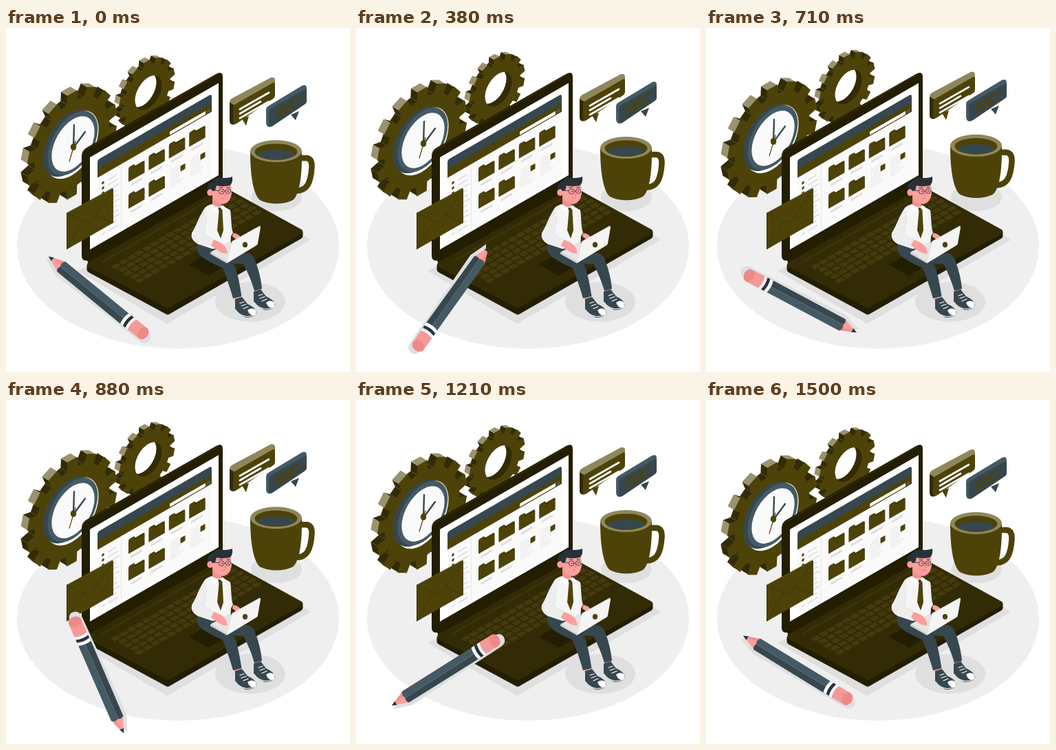
Recreate the animation shown at these times as an HTML page. Size 500 by 500 pixels, loop 1540 ms.

```html
<!DOCTYPE html>
<html lang="en">
<head>
<meta charset="utf-8">
<title>Desk work</title>
<style>
  html, body { margin: 0; width: 100%; height: 100%; overflow: hidden; background: #fff; }
  svg { display: block; width: 100%; height: 100%; }
</style>
</head>
<body>
<svg id="stage" viewBox="0 0 500 500"></svg>
<script>
const C = {
  olive: '#4d4309', deep: '#332b05', dark: '#231d02', pale: '#9a9270',
  blue: '#37474f', slate: '#455a64', ink: '#263238',
  skin: '#fb9f9c', pink: '#f28f8f', shade: '#dfdfdf', floor: '#efefef'
};

const path = (d, fill, extra = '') => `<path d="${d}" fill="${fill}" ${extra}/>`;
const line = (d, stroke, w = 1) =>
  `<path d="${d}" fill="none" stroke="${stroke}" stroke-width="${w}" stroke-linecap="round" stroke-linejoin="round"/>`;
const oval = (x, y, rx, ry, fill) => `<ellipse cx="${x}" cy="${y}" rx="${rx}" ry="${ry}" fill="${fill}"/>`;
const rect = (x, y, w, h, fill, r = 0) => `<rect x="${x}" y="${y}" width="${w}" height="${h}" rx="${r}" fill="${fill}"/>`;
const group = (matrix, body) => `<g transform="matrix(${matrix})">${body}</g>`;
const round = (fill, w) => `stroke="${fill}" stroke-width="${w}" stroke-linejoin="round"`;
const disc = (x, y, r, fill) => group(`.866 -.5 0 1 ${x} ${y}`, `<circle r="${r}" fill="${fill}"/>`);
const poly = p => 'M' + p.map(q => q.map(v => v.toFixed(1)).join(' ')).join('L') + 'Z';

// Extruded cog standing in the left-facing isometric plane.
function cog(cx, cy, outer, root, dx, dy) {
  const teeth = 14, step = 2 * Math.PI / teeth, pts = [];
  for (let i = 0; i < teeth; i++) {
    for (const [k, r] of [[-.3, root], [-.23, outer], [.23, outer], [.3, root]]) {
      const a = -1.56 + (i + k) * step, x = r * Math.cos(a);
      pts.push([cx + .866 * x, cy - .5 * x + r * Math.sin(a)]);
    }
  }
  let sides = '', tips = '';
  pts.forEach((p, i) => {
    const q = pts[(i + 1) % pts.length], nx = q[1] - p[1], ny = p[0] - q[0];
    if (nx * dx + ny * dy <= 0) return;
    const quad = poly([p, q, [q[0] + dx, q[1] + dy], [p[0] + dx, p[1] + dy]]);
    if (i % 4 === 1 && ny < 0) tips += path(quad, C.pale);
    else sides += path(quad, C.deep);
  });
  return sides + tips + path(poly(pts), C.olive, round(C.olive, 1.5));
}

// The hole shows white only where its front and back rims overlap.
function smallCog() {
  const hole = '<circle r="22.5" transform="matrix(.866 -.5 0 1 207 94)"/>';
  return cog(205, 95, 46, 38, -8, -4) + `<clipPath id="hole">${hole}</clipPath>` + disc(207, 94, 22.5, C.deep) +
    `<g clip-path="url(#hole)">${disc(199, 90, 22.5, '#fff')}</g>`;
}

function clock() {
  return disc(96, 169.5, 44.5, '#fff') + disc(91.5, 167.5, 43.5, C.blue) + disc(97, 167.5, 42, C.slate) +
    disc(97.5, 168.5, 36, '#fafafa') +
    line('M98 174L99 141M98 174L115 151', C.blue, 2.4) + line('M101 164L92 194', C.olive, 1.2) +
    oval(98, 173, 4.2, 5, C.olive);
}

function mug() {
  return line('M428 189L437 189Q445 190 444.5 202C443 226 437 237 421 236.5', C.olive, 8.5) +
    path('M355 180C355 217 360 243 369 250C382 257 404 257 417 250C426 243 430.5 217 430 180Z', C.olive) +
    oval(392.5, 179, 37.5, 16, '#8f875c') + oval(392.5, 180, 31, 11.8, C.olive) + oval(392.5, 183.8, 26, 6.8, C.blue);
}

function bubbles() {
  return path('M343 132L349 142L353 128Z', C.olive) +
    path('M325 108Q325 104 329 102L385 72Q391 71 391 76L391 84L330 118Z', '#8f875c') +
    path('M325 108L333 113V140Q325 142 325 135Z', C.deep) +
    path('M330 116Q330 113 333 111L388 79.5Q391 78 391 82L391 98Q391 101 388 103L335 139Q330 141 330 136Z', C.olive) +
    line('M340 118L382 94M340 124.5L370 107M340 131L382 107', '#fff', 2.8) +
    path('M414 126L421 134L426 121Z', C.blue) +
    path('M378 119Q378 115 382 113L430 84Q437 81 437 88L437 106Q437 109 434 111L388 142Q379 147 378 138Z', C.slate) +
    path('M382 122Q382 119 385 117L433 90Q437 88 437 92L437 106Q437 109 434 111L388 142Q382 146 382 140Z', C.blue) +
    line('M393 120L427 100M393 125.5L416 112M393 131L427 111', C.olive, 2.5);
}

function folder(x, y) {
  return path(`M${x} ${y + 3}Q${x} ${y} ${x + 2} ${y}H${x + 8}L${x + 10} ${y + 3}H${x + 21}Q${x + 23.5} ${y + 3} ${x + 23.5} ${y + 6}V${y + 21}H${x}Z`, C.olive) +
    line(`M${x + 8} ${y + 2.5}L${x + 10} ${y + 5}H${x + 23}`, C.deep, .8) +
    rect(x + 3, y + 26, 17, 3, '#dcdcdc', 1);
}

function note(x, y) {
  let s = '';
  for (let i = 0; i < 8; i++) s += rect(x, y + i * 3.6, i < 3 ? 13 : 19 - i % 3 * 3, 1.1, '#e0e0e0');
  return s + rect(x + 14.5, y + 2.5, 7, 8, C.olive, 1);
}

function screen() {
  let s = rect(0, 0, 187, 134, '#fff') + rect(11, 20, 166, 110, '#fafafa') +
    path('M11 14Q11 10 14 10H174Q177 10 177 14V24H11Z', C.blue) + rect(11, 23, 166, 13, C.olive) +
    rect(116, 29.5, 52, 5, '#fff', 1) + rect(169.5, 29.5, 5, 5, C.slate, 2) +
    rect(45, 36, .8, 94, '#e2e2e2');
  for (let i = 0; i < 11; i++) {
    const y = 47 + i * 7.4;
    s += rect(26, y, 13 + i % 3 * 2, 2, '#dedede', 1);
    s += i < 3 ? oval(19, y + 1, 1.8, 2, C.olive) : rect(17, y, 5, 2, '#dedede');
  }
  for (let i = 0; i < 4; i++) s += folder(56 + i * 29.4, 47);
  s += folder(56, 86) + folder(85.4, 86) + note(117, 86) + note(146, 86);
  return group('1 -.577 0 1 122 188', s);
}

function laptop() {
  let keys = '';
  for (let r = 0; r < 5; r++) {
    for (let c = 0; c < 16; c++) keys += rect(c * 11.3 + r % 2 * 1.5, r * 8.7, 9.3, 6.6, '#443a0d', 1);
  }
  return path('M104 353L234 430L443 308L420 293L120 345Z', C.shade) +
    path('M110 186Q110 178 117 174L306 66.5Q315 62 315 71V238L122 348L118 338Q110 339 110 331Z', C.dark) +
    line('M111.5 183Q112 179 118 176L307 68', C.deep, 1.5) + screen() +
    path('M122 346L235 408L427 297V302L235 412L122 351Z', C.dark, round(C.dark, 9)) +
    path('M122 344L316 235L427 296L235 403Z', C.deep, round(C.deep, 8)) +
    line('M140 340L318 238', '#3d3309', 3) +
    group('1 -.577 1 .577 152 347', keys) +
    path('M266 344L291 329L320 345L295 360Z', C.dark);
}

function envelope() {
  return path('M88 269L154 233L156 234V283L88 322Z', C.olive) +
    line('M88.5 269L155 233.5', '#5c5219', 1) + line('M88.5 269V321', C.deep, .8) +
    line('M90 270L118 282Q123 284 125 279L155 236M89 320L113 280M155 283L130 272', '#3d3407', .9);
}

function shoe(x, y) {
  return group(`1 0 0 1 ${x} ${y}`,
    path('M0 3L10 0L18 10Q31 16 31 23Q28 30 16 30Q2 25 0 17Z', C.blue) +
    path('M18 19Q24 14 30 19Q32 24 27 27Q21 27 18 19Z', '#fff') +
    line('M1 19Q6 27 17 28.5Q27 28 30 24', '#fff', 1.2) +
    line('M7 9L13 7M9 13L16 10.5M12 17L19 14', '#fff', 1.2));
}

function man() {
  return oval(355, 398, 51, 29, C.shade) +
    path('M361 378L371 377L372 384L362 386Z', C.skin) + path('M331 390L342 389L343 395L333 397Z', C.skin) +
    shoe(360, 380) + shoe(333, 391) +
    path('M318 322L344 328C351 325 359 329 362 337C368 353 371 367 372 379L361 382C357 368 351 354 345 343L318 342Z', C.blue) +
    path('M278 314C274 330 290 337 315 349C321 364 326 379 330 393L342.5 390C340 374 337 358 333 346C327 332 312 318 300 314Z', C.blue) +
    line('M320 336Q331 341 333 349', C.ink, .8) +
    path('M300 244H313V258Q308 265 300 258Z', C.pink) +
    path('M299 256Q291 258 288 263C279 277 276 290 270 298Q268 308 279 314L300 321L326 318C328 300 327 276 325 264L314 258Q308 263 299 256Z', '#f5f5f5') +
    path('M290 260C279 277 276 290 270 298Q268 308 279 314L300 318L306 310L288 300C289 294 290 287 292 276Z', '#ededed') +
    path('M322 268L326 264C328 280 327 290 330 297L326 305Z', '#f0f0f0') +
    line('M292 276C290 287 289 294 288 300L306 310', '#dcdcdc', .8) +
    path('M308 261L314 261L314.5 266L316 294L312 306L307 294L309.5 266Z', C.olive) +
    path('M299 256L309 262L304 267L297 260ZM314 257L312 262L317 266L318 260Z', '#fff') +
    path('M330 298Q337 298 342 305L337 309L329 303Z', C.skin) +
    path('M297 326L324 311L345 322L321 341Z', '#e4e4e4') + path('M297 326L321 339.5V342L297 328.5Z', '#cfcfcf') +
    path('M302 308Q313 311 318 317Q323 325 321 328Q315 328 309 324L298 316Z', C.skin) +
    path('M328 312Q328 310 330 309L368 288Q370 287 370 290L366 313Q366 315 364 316L321 342Z', '#f4f4f4') +
    line('M321 341L328 311L369 288', '#dcdcdc', .8) + oval(347.5, 315, 3.6, 4, C.olive) +
    path('M300 229L327 225L328 241Q326 254 316 256Q303 255 300 245Z', C.skin) +
    oval(296.8, 239, 4.5, 5, C.skin) + line('M295 238Q298 238 298 241', C.pink, .8) +
    path('M293 235Q292 225 300 223Q304 216 316 218Q324 218 329 216Q330 226 325 229Q313 231 306 229L304 236L300 237L298 234Z', C.ink) +
    line('M301 236L309 236.5M317 237L319.5 237', C.ink, .8) +
    `<g fill="none" stroke="${C.ink}" stroke-width=".8"><circle cx="313.2" cy="237.5" r="3.8"/><circle cx="323" cy="237" r="3.5"/></g>` +
    oval(314, 237.5, .8, 1.1, C.ink) + oval(323, 237, .8, 1.1, C.ink) +
    line('M310 232L315 231.5M321 231.5L325 231.5', C.ink, .8) +
    line('M318.5 238L320 243L317.5 243M314 247.5Q317 248.5 319 246.5', '#d96b6b', .8);
}

function pencil() {
  return path('M50 387L206 381.5L232 390.5L215 402L60 405Q41 408 40.5 397Q41 388 50 387Z', C.shade) +
    path('M208 387.5L231 396L208 405.5Z', C.skin) + path('M208 399L231 396L208 405.5Z', C.pink) +
    path('M224 393L231.5 396L224 399.5Q225.5 396 224 393Z', C.ink) +
    path('M86 388.5L208 387Q211 391 209 395.5L86 398Z', C.blue) +
    path('M86 398L209 395.5Q212 401 208 406L86 408Z', C.slate) +
    path('M74 389L89 388.5Q92 398 89 408L74 408.5Z', '#f5f5f5') +
    path('M79.5 388.9L84 388.7Q87 398 84 408.2L79.5 408.3Q82.5 398 79.5 388.9Z', C.ink) +
    path('M54 389.7L75 389Q78.5 399 75 408.5L54 408.8Z', '#f39a99') + oval(54.5, 399.2, 7.5, 9.6, '#ee8987');
}

const stage = document.getElementById('stage');
stage.innerHTML =
  oval(250, 317.5, 234, 148.5, C.floor) + oval(393, 246, 37, 20, C.shade) +
  `<g id="bob">${smallCog()}${cog(96, 170, 75, 62, -10, -6)}${clock()}${mug()}${bubbles()}</g>` +
  laptop() + envelope() + man() + `<g id="pencil">${pencil()}</g>`;

// [step, value] pairs over the 37 steps of a loop
const TURN = [[0, -139.8], [3, -112.8], [9, -53.5], [14, 0], [21, 67.4], [29, 148.7], [36, 212.3], [37, 220.2]];
const LIFT = [[0, 0], [3, -1.7], [9, -5], [14, -7.7], [17.5, -8.2], [21, -7.7], [29, -3], [36, 0], [37, 0]];
const LOOP = 1540;

function at(keys, n) {
  const i = keys.findIndex(k => k[0] > n), [a, u] = keys[i - 1], [b, v] = keys[i];
  return u + (v - u) * (n - a) / (b - a);
}

const bob = document.getElementById('bob'), pen = document.getElementById('pencil');

function draw() {
  // 24 steps a second, each start rounded to 10 ms
  const tick = Math.floor(performance.now() % LOOP / 10);
  const n = Math.ceil((2 * tick + 1) * 3 / 25) - 1;
  bob.setAttribute('transform', `translate(0 ${at(LIFT, n)})`);
  pen.setAttribute('transform', `rotate(${at(TURN, n)} 135 395)`);
  requestAnimationFrame(draw);
}
draw();
</script>
</body>
</html>
```
